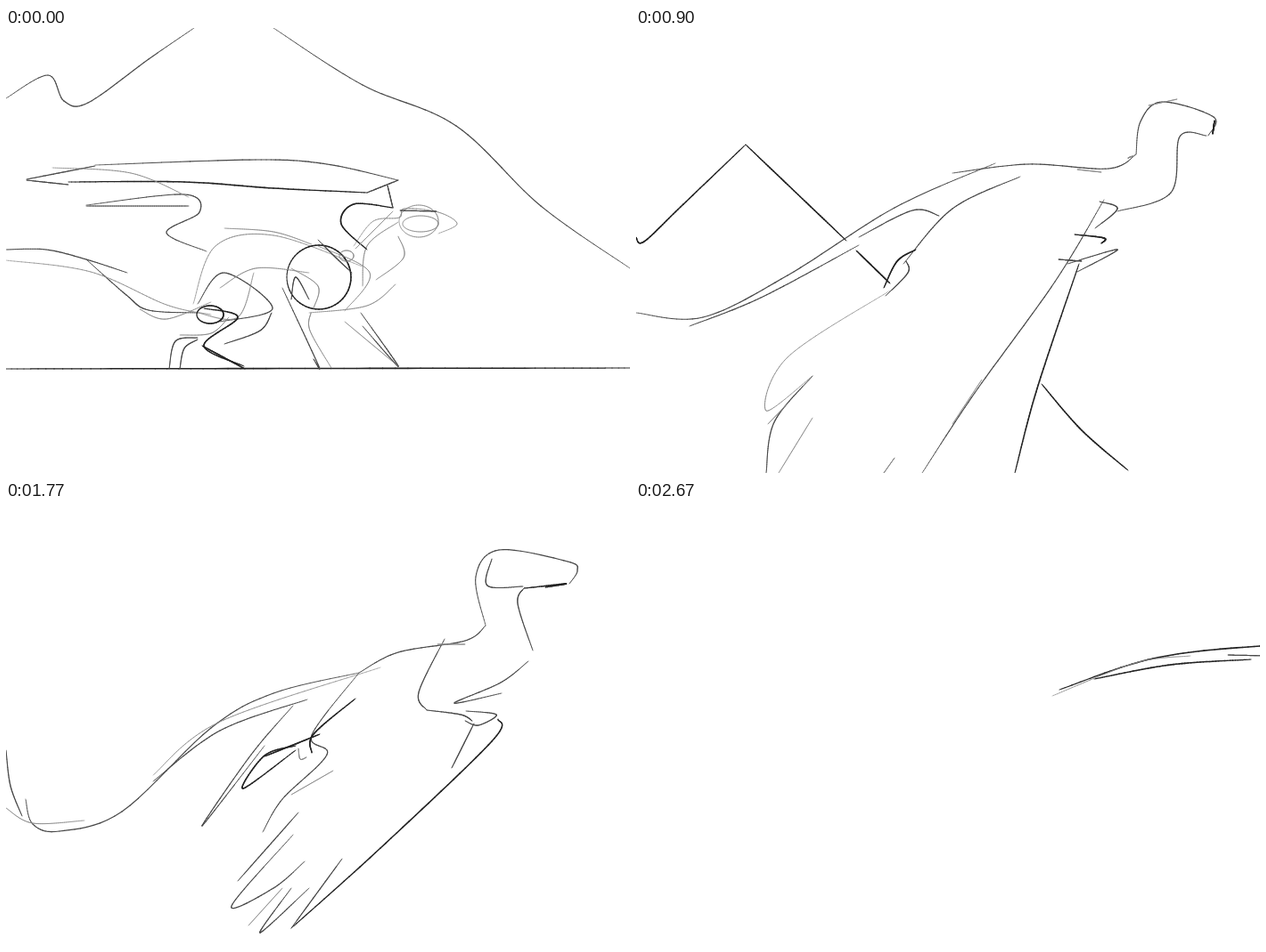
An HTML page with a canvas that plays this animation: 700x500 px, repeating every 2.76 s.

```html
<!DOCTYPE html>
<html lang="en">
<head>
<meta charset="utf-8">
<title>Winged creature takes off</title>
<style>
  html, body { margin: 0; width: 100%; height: 100%; overflow: hidden; background: #fff; }
  canvas { display: block; }
</style>
</head>
<body>
<canvas id="stage" width="700" height="500"></canvas>
<script>
const LOOP = 2760, SAMPLES = 60;
const ctx = document.getElementById('stage').getContext('2d');
const pens = { '!': ['#222', 1.6], '~': ['#888', 0.9] };
const tracks = {};

// One smooth stroke through a few points, or "o cx cy rx ry" for a loop.
// A leading ! is a dark line, ~ a faint one.
function trace(text) {
  const body = text.replace(/^[!~]/, '');
  const n = body.replace('o ', '').split(' ').map(Number);
  const last = n.length / 2 - 1, path = [];
  for (let k = 0; k <= SAMPLES; k++) {
    if (body[0] === 'o') {
      const angle = Math.PI * (1 + 2 * k / SAMPLES);
      path.push([n[0] + n[2] * Math.cos(angle), n[1] + n[3] * Math.sin(angle)]);
      continue;
    }
    const s = k / SAMPLES * last, i = Math.min(Math.floor(s), last - 1), f = s - i;
    path.push([0, 1].map(axis => {
      const [a, b, c, d] = [-1, 0, 1, 2].map(o => n[2 * Math.max(0, Math.min(last, i + o)) + axis]);
      return b + f * (c - a + f * (2 * a - 5 * b + 4 * c - d + f * (3 * (b - c) + d - a))) / 2;
    }));
  }
  return { path, pen: pens[text[0]] || ['#484848', 1.2] };
}

const key = (part, time, ...strokes) =>
  (tracks[part] ||= []).push({ time, strokes: strokes.map(trace) });

// Repeats an earlier pose of a part at another time and place.
function repeat(part, earlier, time, dx, dy) {
  const { strokes } = tracks[part].find(k => k.time === earlier);
  tracks[part].push({ time, strokes: strokes.map(({ path, pen }) =>
    ({ path: path.map(([x, y]) => [x + dx, y + dy]), pen })) });
}

key('mountain', 0, '0 79 47 53 65 82 92 84 160 35 211 0', '300 0 400 64 505 110 600 200 700 270');
key('mountain', 540, '!0 64 28 40 37 73 60 82 96 77 170 0', '!605 247 640 278 700 327');
key('mountain', 900, '!0 235 9 240 50 201 123 131', '!455 400 500 452 552 497', '!123 131 236 239', '!247 250 285 287');
key('mountain', 1410, '!-390 260 -260 150', '!82 457 105 474 142 500', '!-260 150 0 375 73 443');
key('mountain', 1770, '-800 260 -660 150', '-320 500 -260 543', '-660 150 -330 440');

key('ground', 0, '!0 383 700 382', '!1000 383 990 500');
key('ground', 540, '!0 397 687 397', '!687 397 682 450 671 500', '!100 397 110 393 119 397',
  '!157 398 168 402 176 396', '!265 399 277 406 291 399', '!344 399 354 402 363 398', '!47 387 50 386', '!89 384 95 385');
key('ground', 900, '!-200 720 460 720', '!460 720 445 820');

key('tail', 0, '0 249 45 249 90 260 136 275', '90 260 135 300 160 317 215 320', '~0 261 95 274 180 311 230 322', '~150 316 180 327 230 308');
key('tail', 540, '0 283 100 289 230 259 290 232 350 217', '~102 304 180 301 270 287', '~0 293 70 299');
key('tail', 900, '0 320 75 325 170 278 290 202 403 152', '60 335 140 303 250 244', '250 235 310 205 340 211');
key('tail', 1410, '0 437 70 444 182 402 215 290 260 240 342 198', '203 368 255 280 312 245', '~0 452 90 441 185 403 205 368', '~270 267 325 247');
key('tail', 1770, '22 335 30 363 60 371 130 349 230 255 300 216 396 193', '165 315 240 258 338 223', '~0 345 30 362 88 359', '0 280 5 320 18 354', '~165 308 240 248 420 187');
key('tail', 2310, '81 382 140 398 220 368 320 265 380 215 465 177', '282 310 330 258 440 205 504 191', '~182 391 215 373', '410 194 452 178');
key('tail', 2670, '!475 212 580 177 700 163 850 158', '!514 200 600 184 690 178', '~467 219 560 182 622 174', '664 173 710 174');

key('body', 0, '~210 310 235 245 300 233 400 268', '!o 351 280 36 36', '~340 320 405 312 437 288', '215 310 245 275 299 315 240 330',
  '~245 225 300 229 343 243', '~350 245 408 275 380 318', '~215 320 260 325 278 275', '~240 292 280 270 340 275', '350 238 370 258 388 275', '~o 382 256 8 6', '~320 270 350 290 345 315');
key('body', 540, '470 178 520 194 590 195', 'o 460 220 55 41', '!386 248 425 246', '375 222 365 265 325 293',
  '~o 468 217 50 39', '470 180 517 225 470 256', '~470 178 543 225 450 265', '325 222 302 262 345 292');
key('body', 900, '355 163 440 153 530 158 561 142', '431 167 355 203 300 265', '~495 159 522 162');
key('body', 1410, '322 201 342 198', '383 184 409 220 380 262 345 262', '358 266 410 249 435 246 460 258', '~328 276 355 264');
key('body', 1770, '396 193 440 170 515 157 538 140', '492 155 463 215 472 235', '~484 161 515 161');
key('body', 2310, '410 192 460 176 530 156 660 143 693 136', '~660 143 700 125');
repeat('body', 2310, 2670, 400, 8);

key('head', 0, '~390 245 412 217 441 213 447 203 485 207 506 220 485 231', '~440 234 446 258 415 283', '~o 463 217 22 18', '442 205 483 206', '~o 465 220 20 9', '~400 290 405 245 440 218');
key('head', 540, '590 195 612 165 632 153 680 163 698 178 680 188', '680 189 641 195 605 245 540 249', '~640 155 624 180 660 191 695 180', '!675 161 697 173 670 186', '~598 172 602 160 645 150');
key('head', 900, '561 142 566 105 590 83 648 100 642 121', '640 121 610 122 600 185 540 206', '~575 87 607 80', '!649 104 647 119', '~552 146 557 144');
key('head', 1410, '518 180 537 150 535 120 558 84 636 84 628 114', '628 114 590 126 585 215 530 247', '555 92 565 122 595 123', '!638 93 626 112', '~570 124 602 115');
key('head', 1770, '538 140 527 85 553 55 630 68 641 78 632 93', '582 97 574 115 591 168', '545 65 540 95 580 96', '!582 98 628 93 605 97');
key('head', 2310, '693 136 720 75 780 60 815 75 800 95', '790 95 745 130 735 190');
repeat('head', 2310, 2670, 400, 8);

key('fore', 0, '310 292 350 378 345 372', '398 320 440 380 400 335', '~342 320 341 340 365 382', '~380 330 440 380', '320 305 325 280 340 305');
key('fore', 540, '!425 247 440 259 505 279', '460 255 559 280 545 317 538 290 530 280', '505 279 525 285 492 303 510 285', '!495 258 540 270');
key('fore', 900, '515 225 540 203 520 195', '484 265 540 249 495 274', '!492 232 525 236 522 242', '474 260 500 262');
key('fore', 1410, '479 217 448 265 505 283', '510 257 556 266 510 284 498 311 545 278', '!541 207 497 256 540 250', '!453 272 507 284', '525 180 541 218 530 247', '~548 238 585 225 590 208');
key('fore', 1770, '472 235 510 240 523 247', '516 236 550 240 530 252 515 247', '586 180 555 204 503 227 556 216');
key('fore', 2310, '!656 236 692 235 682 247 652 253', '!652 235 685 222', '693 182 685 228 665 234', '~700 168 655 222 650 243');
repeat('fore', 2310, 2670, 400, 8);

key('hind', 0, '!222 315 260 325 222 357 267 380', '215 348 190 352 183 383', '195 383 200 360 215 350', '!220 357 268 383', '!o 229 322 15 10', '245 355 285 340 298 320', '~195 345 230 343 250 325');
key('hind', 540, '315 245 308 262 260 276 230 318 219 321 235 327', '270 290 212 364 210 345 265 290', '345 292 300 283 270 290', '~345 288 310 302 262 310');
key('hind', 900, '!278 292 293 262 314 249', '303 262 305 275 280 301');
key('hind', 1410, '327 272 308 280 325 350 328 275', '332 275 340 338 340 270', '!329 290 330 345');
key('hind', 1770, '322 230 275 285 220 365 290 275', '!325 275 290 286 266 323 325 280', '~328 278 330 290 337 288', '!290 287 352 262');
key('hind', 2310, '460 210 385 236 362 243 395 240 463 223', '!443 222 481 242');
repeat('hind', 2310, 2670, 400, 8);

key('wing', 0, '!405 249 376 220 390 198 434 202', '90 199 200 187 217 207 180 230 225 251', '!405 185 300 180 200 173 70 173', '100 154 280 148 360 153 440 171',
  '440 171 405 185', '23 170 100 155', '23 171 70 176', '90 200 205 200', '~52 157 140 163 205 190', '434 202 428 177', '~434 206 392 248');
key('wing', 540, '553 197 513 160 570 110 605 0', '290 0 325 45 263 150 295 211 375 220', '448 135 515 70 505 0', '!452 140 460 165 480 180', '515 50 518 0', '~585 55 577 95 604 0', '~265 178 285 205', '!513 163 525 185 553 197');
key('wing', 900, '525 193 470 285 380 410 321 500', '~198 391 146 430 170 370 285 295', '!497 265 450 405 425 500', '198 391 155 443 146 500', '~198 438 160 500', '~290 483 278 500', '~388 395 355 445', '~148 445 172 420');
key('wing', 1410, '!518 180 517 155 570 0', '327 207 370 90 402 48', '~615 0 556 48', '!369 162 400 60 467 0', '342 198 376 170 374 142', '~390 90 453 0');
key('wing', 1770, '!552 245 545 270 420 390 320 480', '288 372 310 335 360 285 343 263 396 193', '525 250 500 300', '328 350 260 427', '322 375 253 455 300 435 335 405',
  '320 435 285 485 340 435', '377 402 320 480', '!343 283 345 262 392 222', '~310 435 272 477', '~367 303 320 330');
repeat('wing', 1410, 2040, 70, -20);
key('wing', 2310, '654 163 655 240 637 400 625 500', '533 183 460 260 442 358', '637 375 636 442', '!454 352 450 415 432 452', '478 419 445 450 435 500', '508 438 486 500', '498 447 465 500', '~432 470 462 428', '500 447 440 500');
repeat('wing', 2310, 2670, 400, 8);

const mix = (a, b, u) => a + (b - a) * u;

// Pencil line with thin ends.
function draw(path, [color, width]) {
  ctx.strokeStyle = color;
  for (let k = 1; k < path.length; k++) {
    ctx.lineWidth = width * (0.5 + 0.5 * Math.sqrt(Math.sin(Math.PI * (k - 0.5) / SAMPLES)));
    ctx.beginPath();
    ctx.moveTo(...path[k - 1]);
    ctx.lineTo(...path[k]);
    ctx.stroke();
  }
}

function drawTrack(keys, time) {
  const i = keys.findLastIndex(k => k.time <= time);
  const from = keys[i], to = keys[i + 1] || from;
  const u = to === from ? 0 : (time - from.time) / (to.time - from.time);
  const near = u < 0.5 ? from : to;
  const start = from.strokes[0].path[SAMPLES / 2], end = to.strokes[0].path[SAMPLES / 2];
  const drift = near === from ? u : u - 1;
  near.strokes.forEach(({ path, pen }, s) => {
    const a = from.strokes[s], b = to.strokes[s];
    // Loose sketch lines without a partner ride along with the part.
    draw(path.map((p, k) => [0, 1].map(axis => a && b
      ? mix(a.path[k][axis], b.path[k][axis], u)
      : p[axis] + (end[axis] - start[axis]) * drift)), pen);
  });
}

// Drawings are held for 90 ms, three of them for 80 ms.
function held(t) {
  const [start, step] = t < 900 ? [0, 90] : t < 1140 ? [900, 80] : [1140, 90];
  return start + Math.floor((t - start) / step) * step;
}

let shown = -1;
const origin = performance.now();
function frame() {
  const time = held((performance.now() - origin) % LOOP);
  if (time !== shown) {
    shown = time;
    ctx.fillStyle = '#fff';
    ctx.fillRect(0, 0, 700, 500);
    Object.values(tracks).forEach(keys => drawTrack(keys, time));
  }
  requestAnimationFrame(frame);
}
ctx.lineCap = 'round';
frame();
</script>
</body>
</html>
```
